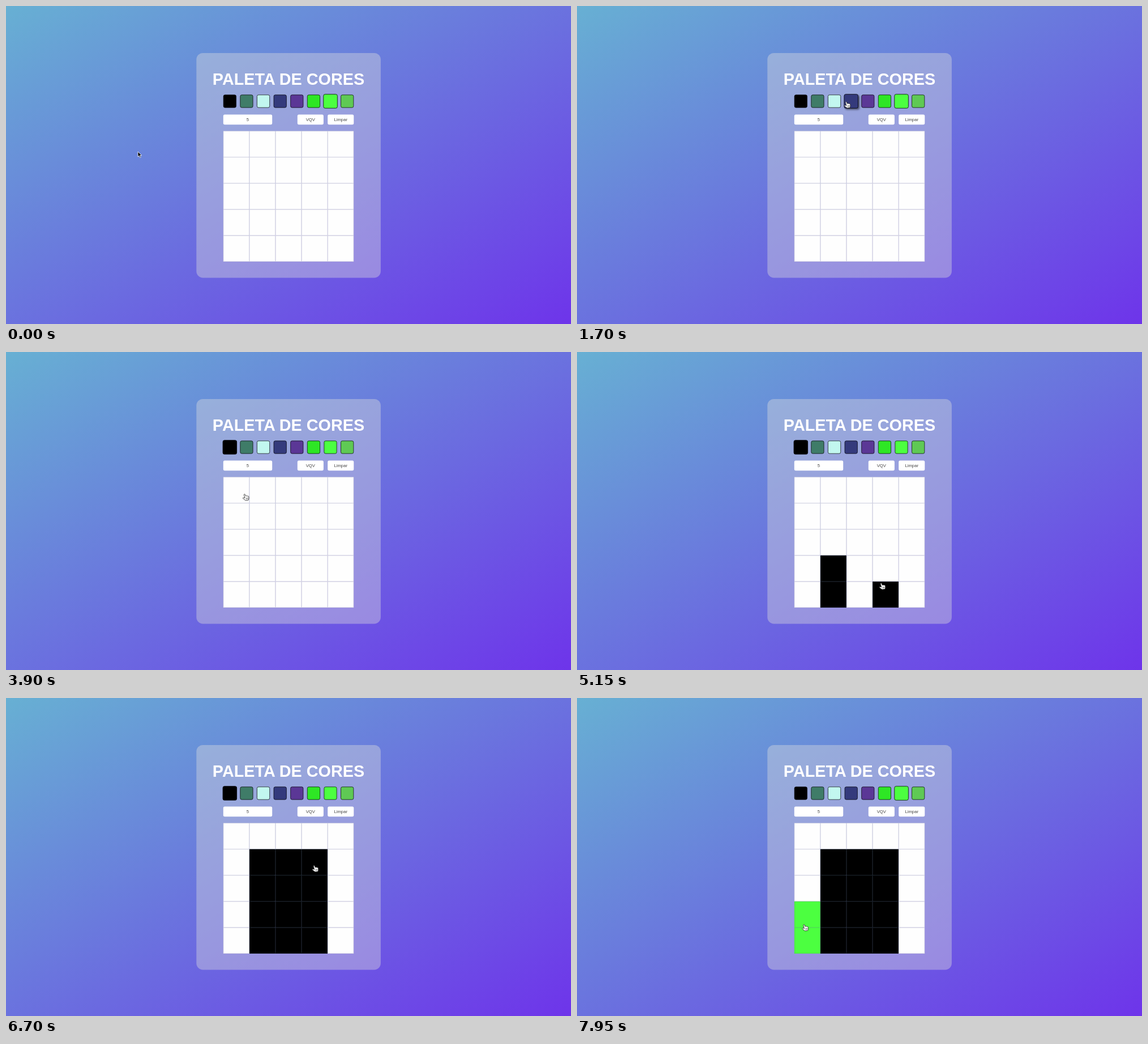
An HTML page for the animation above (8000 ms loop, 998x561 px).

```html
<!DOCTYPE html>
<html lang="pt">
<head>
<meta charset="utf-8">
<title>Paleta de cores</title>
<style>
  html, body { margin: 0; width: 100%; height: 100%; overflow: hidden; }
  svg { display: block; width: 998px; height: 561px; }
  text { font-family: "Liberation Sans", Arial, sans-serif; text-anchor: middle; }
  .title { font-size: 28.8px; font-weight: bold; fill: #fff; }
  .label { font-size: 7.68px; fill: #444; }
  .hover { filter: drop-shadow(2px 2px 1.5px rgba(0, 0, 0, .5)); }
</style>
</head>
<body>
<svg viewBox="0 0 998 561" xmlns="http://www.w3.org/2000/svg">
  <defs>
    <linearGradient id="sky" x1="0" y1="0" x2="1" y2="1">
      <stop offset="0" stop-color="#67b0d3"/>
      <stop offset="1" stop-color="#6e34ea"/>
    </linearGradient>
  </defs>
  <rect width="998" height="561" fill="url(#sky)"/>
  <rect x="336.3" y="83" width="325.6" height="396.4" rx="11.5" fill="#dcdcdc" fill-opacity=".4"/>
  <text class="title" x="499" y="138.8">PALETA DE CORES</text>
  <g id="swatches"></g>
  <g id="controls"></g>
  <g id="cells"></g>
  <g id="cursor">
    <path id="arrow" d="M0 0V9L2.1 7.1L3.6 10.4L5.2 9.7L3.7 6.5H6.6Z"
      fill="#000" stroke="#fff" stroke-width=".8" stroke-linejoin="round"/>
    <g id="hand" transform="scale(.92)" stroke="#222" stroke-linejoin="round" stroke-linecap="round">
      <path d="M-2.2 1C-2.4 -.4 -.4 -.8 .1 .6L1.2 3.6C1.8 2.8 3 2.9 3.4 3.7C4 2.9 5 3.1 5.4 4C6.1 3.4 7 3.8 7 4.8L7.3 8C7.3 9.5 6.6 10 6.4 11.2L1 12L-3.4 8.8C-5 7.4 -3.9 6 -2.6 6.6L-.8 7.2Z"
        fill="#fff" stroke-width=".9"/>
      <path d="M2 7.2L2.3 9.6M3.7 7L4 9.3M5.3 6.8L5.5 9" fill="none" stroke-width=".6"/>
    </g>
  </g>
</svg>
<script>
const LOOP = 8000, STEP = 50;
const LEFT = 383.8, TOP = 220.6, CELL = 46.08, COUNT = 5, BOARD = CELL * COUNT;
const COLORS = ['#000', '#3f7c68', '#c2f7ef', '#343a7c', '#5b3796', '#2ee625', '#4cff40', '#5fc954'];
const BOX = CELL / 2, PITCH = (BOARD - BOX) / (COLORS.length - 1), ROW_Y = 168;
const BLACK = 0, GREEN = 6;

const $ = id => document.getElementById(id);

function set(el, attrs) {
  for (const key in attrs) el.setAttribute(key, attrs[key]);
  return el;
}

function add(parent, tag, attrs) {
  const el = document.createElementNS('http://www.w3.org/2000/svg', tag);
  return parent.appendChild(set(el, attrs));
}

// Places the pointer visits, each with an offset from its centre
const swatch = (index, dx = 0, dy = 1) =>
  ({ index, x: LEFT + BOX / 2 + index * PITCH + dx, y: ROW_Y + dy });
const cell = (col, row, dx = 0, dy = 0) =>
  ({ col, row, x: LEFT + (col + .5) * CELL + dx, y: TOP + (row + .5) * CELL + dy });
// A tap picks a swatch, or paints a block reaching left and down from a cell
const tap = (place, wide = 1, high = 1) => ({ ...place, tapped: true, wide, high });

const legs = [];
let last = { x: 233, y: 257 };

// One sweep of the mouse, its time shared evenly between the stops
function sweep(from, to, ...stops) {
  const span = (to - from) / stops.length;
  stops.forEach((stop, i) => {
    legs.push({ start: from + span * i, end: from + span * (i + 1), a: last, b: stop });
    last = stop;
  });
}

sweep(100, 850, swatch(6, 4));
sweep(1000, 1850, swatch(0, -3), swatch(3, 4));
sweep(1850, 2700, swatch(7, 6));
sweep(2750, 3600, swatch(4, -26, -12), tap(swatch(0)), cell(0, 0, 0, -12));
sweep(3600, 4450, cell(0, 0, 17, 9), tap(cell(1, 4, 18, -10)));
sweep(4450, 5300, tap(cell(1, 3, 5, 14)), tap(cell(3, 4, -7, -4)), tap(cell(3, 3, -7, 20)));
sweep(5300, 5850, tap(cell(2, 2)), tap(cell(2, 3, 0, 8), 1, 2));
sweep(6050, 6700, tap(cell(1, 1), 1, 2), tap(cell(3, 1, 0, 6), 2, 2));
sweep(6800, 7650, tap(swatch(GREEN)), cell(1, 2, 15, 2));
sweep(7650, 7950, tap(cell(0, 4)), tap(cell(0, 3, -5, 18)));

const swatches = COLORS.map(fill => {
  const side = BOX - .7;
  return add($('swatches'), 'rect', {
    x: -side / 2, y: -side / 2, width: side, height: side, rx: 2.6,
    fill, stroke: '#000', 'stroke-width': .7
  });
});

function control(x, width, label) {
  add($('controls'), 'rect', { x, y: 191.5, width, height: 17.7, rx: 2.6, fill: '#fff' });
  add($('controls'), 'text', { class: 'label', x: x + width / 2, y: 203.1 }).textContent = label;
}
control(LEFT, 86.4, '5');
control(514.8, CELL, 'VQV');
control(568.2, CELL, 'Limpar');

const cells = Array.from({ length: COUNT * COUNT }, (_, i) => add($('cells'), 'rect', {
  x: LEFT + i % COUNT * CELL + .3, y: TOP + Math.floor(i / COUNT) * CELL + .3,
  width: CELL - .6, height: CELL - .6, 'stroke-width': .6
}));

function pointer(t) {
  const leg = legs.findLast(l => l.start <= t) || legs[0];
  const u = Math.min(1, Math.max(0, (t - leg.start) / (leg.end - leg.start)));
  const k = 1 - (1 - u) ** 2;
  return { x: leg.a.x + (leg.b.x - leg.a.x) * k, y: leg.a.y + (leg.b.y - leg.a.y) * k };
}

// Replays every tap up to time t
function board(t) {
  const paint = [];
  let ink = GREEN;
  for (const { end, b } of legs) {
    if (end > t || !b.tapped) continue;
    if ('index' in b) { ink = b.index; continue; }
    for (let i = 0; i < b.wide; i++)
      for (let j = 0; j < b.high; j++) paint[(b.row + j) * COUNT + b.col - i] = ink;
  }
  return { ink, paint };
}

function draw(t) {
  const { x, y } = pointer(t), { ink, paint } = board(t);
  let hand = x > LEFT && x < LEFT + BOARD && y > TOP && y < TOP + BOARD;

  swatches.forEach((el, i) => {
    const home = swatch(i, 0, 0);
    const over = Math.max(Math.abs(x - home.x), Math.abs(y - home.y)) < BOX / 2 + .6;
    hand = hand || over;
    set(el, {
      transform: `translate(${home.x} ${home.y}) scale(${over || i === ink ? 1.1 : 1})`,
      class: over && i !== ink ? 'hover' : ''
    });
  });

  cells.forEach((el, i) => set(el, {
    fill: COLORS[paint[i]] || '#fefefe',
    stroke: paint[i] === BLACK ? '#020a07' : paint[i] === GREEN ? '#43e63c' : '#dadae2'
  }));

  $('hand').style.display = hand ? '' : 'none';
  $('arrow').style.display = hand ? 'none' : '';
  set($('cursor'), { transform: `translate(${x} ${y})` });
}

const begin = performance.now();
function tick() {
  const t = (performance.now() - begin) % LOOP;
  draw(Math.floor(t / STEP) * STEP);
  requestAnimationFrame(tick);
}
draw(0);
requestAnimationFrame(tick);
</script>
</body>
</html>
```
